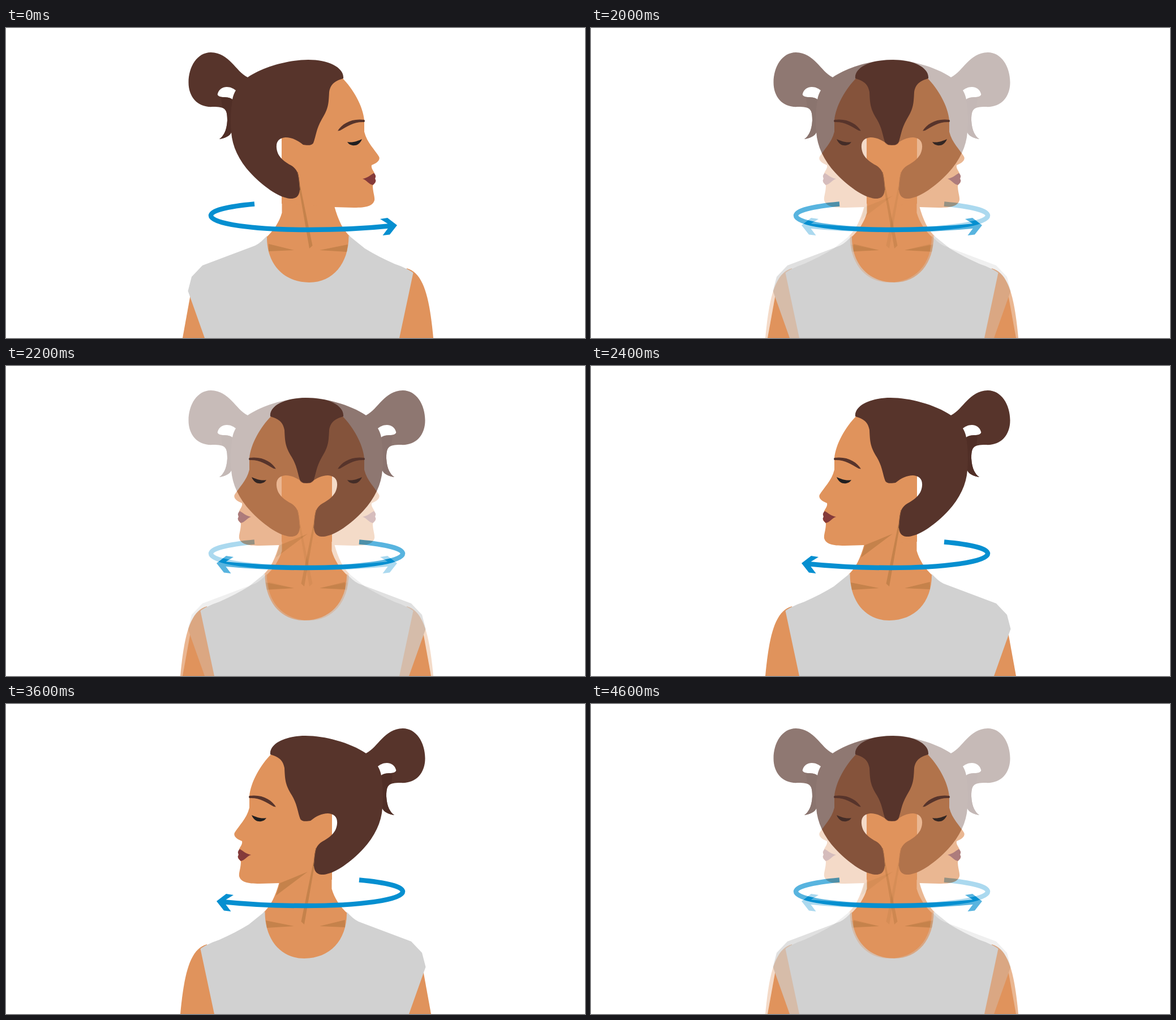
Write an HTML page that moves like this. It is 1023 px wide and 547 px high and loops after 4800 ms.

```html
<!DOCTYPE html>
<html lang="en">
<head>
<meta charset="utf-8">
<title>Neck rotation</title>
<style>
  html, body { margin: 0; width: 100%; height: 100%; overflow: hidden; background: #fff; }
  svg { display: block; width: 100vw; height: 100vh; }
  .skin { fill: #e0935c; }
  .hair { fill: #57342b; }
  .strand { fill: #502e26; }
  .shade { fill: #c5824b; }
  .shirt { fill: #d1d1d1; }
  .lips { fill: #843a3a; }
  .eye { fill: #201f20; }
  .arrow { fill: #058fd0; }
</style>
</head>
<body>
<svg viewBox="0 0 1023 547">
  <defs>
    <g id="body">
      <!-- arms and neck -->
      <path class="skin" d="M326 470L312 547H356L340 470Z"/>
      <path class="skin" d="M708 424C737 432 748 472 755 547H690L705 440Z"/>
      <path class="skin" d="M487.500 285V326C483 342 473 358 458 371V460H608V368C596 357 587 340 580 314L560 270Z"/>
      <path class="shirt" d="M461 367C454 374 448 380 440 384L347 419L328 439L321.500 464L351 547H695L719.500 432C713 427 703 422 686 416C668 408 650 399 634 389L605.500 366C606 415 578 449 536 449C490 449 460 416 461 367Z"/>
      <!-- face -->
      <path class="skin" d="M594 88C613 107 631 138 633 163L633 183C638 203 652 215 659 227C662 233 655 239 646 242C645 247 648 250 651 256L653 272L648 278C648 289 652 298 651 304C648 314 637 317 615 317C602 317 590 316 580 316L487 310V180L560 90Z"/>
    </g>
    <path id="chin" class="shade" d="M530 296L579 316L586 338L558 317Z"/>
    <g id="front">
      <path class="shade" d="M464 381L509 392L464 394ZM554 392L604 382L602 395ZM518 285L520 279L541.500 384L536 389Z"/>
      <!-- hair with ponytail -->
      <path class="hair" fill-rule="evenodd" d="M596 89C587 92 574 95 571 113C570 133 570 142 558 161C548 178 548 190 543 203C540 208 531 207 525 206C515 198 505 193 494 193C483 194 477 200 478 211C479 226 490 235 503 242C515 249 517 258 518 270L519 283C519 294 515 300 506 301C490 302 465 288 440 264C414 239 400 212 398 184C396 190 388 194 377 196C384 191 390 182 391 163C391 143 387 139 366 139C340 141 322.500 123 322.500 96C322.500 68 338 43 362 43C395 44 405 76 427 87C455 68 500 56 534 56C570 56 598 70 596 89ZM374 116C376 108 383 104 390 104C397 104 402 107 406 110C403 115 401 120 400 126C395 121 384 123 378 121C375 120 373 118 374 116Z"/>
      <path class="strand" d="M380 122C388 122 395 122 400 126C397 146 396 164 398 184C396 190 388 194 377 196C384 191 390 182 391 163C391 149 389 142 382 140Z"/>
      <path d="M515 254Q518 266 519.500 286" fill="none" stroke="#8c5a3a" stroke-width="1"/>
      <!-- features -->
      <path class="hair" d="M586 181.500C594 169 610 159 633 162Q635 164 633 166C615 165 604 173 590 181Z"/>
      <path class="eye" d="M603 201C613 203 622 199 629 196C625 206 618 208 612 207C607 206 605 204 603 201Z"/>
      <path class="lips" d="M630 266C638 265 643 260 650 256Q655 260 652 266Q656 271 648 277C641 276 638 269 630 266Z"/>
      <!-- turn arrow -->
      <path d="M439 310.500C390 315 362 322 362 331C362 346 440 356 534 356C590 356 642 353 681 349" fill="none" stroke="#058fd0" stroke-width="8.500"/>
      <path class="arrow" d="M661 337L674 335L691 348L678 364.500L665.500 366L676 352L674 345Z"/>
    </g>
  </defs>
  <rect width="1023" height="547" fill="#fff"/>
  <use href="#body"/>
  <use href="#front"/>
  <g id="turned" opacity="0">
    <rect width="1023" height="547" fill="#fff"/>
    <g transform="translate(1063 0) scale(-1 1)">
      <use href="#body"/>
      <use href="#chin"/>
      <use href="#front"/>
    </g>
  </g>
</svg>
<script>
  const turned = document.getElementById("turned");
  const LOOP = 4800, HALF = 2400, HOLD = 2000, STEP = 200;

  // Each half holds a pose, then blends to the other in two steps.
  function draw(t) {
    const local = t % HALF;
    const mix = local < HOLD ? 0 : (Math.floor((local - HOLD) / STEP) + 1) / 3;
    turned.setAttribute("opacity", t < HALF ? mix : 1 - mix);
  }

  let start;
  function tick(now) {
    start ??= now;
    draw((now - start) % LOOP);
    requestAnimationFrame(tick);
  }
  draw(0);
  requestAnimationFrame(tick);
</script>
</body>
</html>
```
